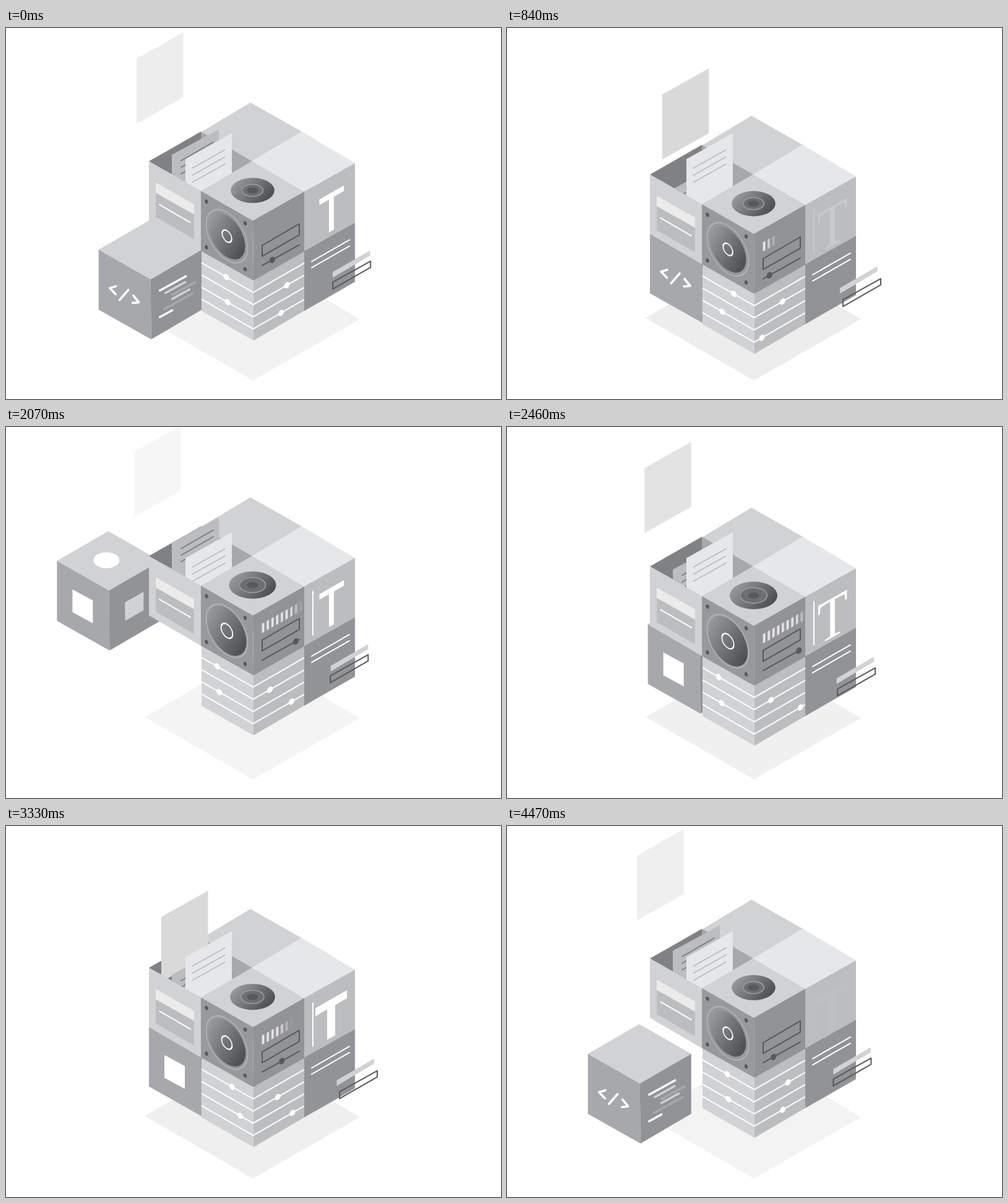
An HTML page for the animation above (4500 ms loop, 800x600 px).

```html
<!DOCTYPE html>
<html lang="en">
<head>
<meta charset="utf-8">
<title>Isometric toolbox</title>
<style>
  html, body { margin: 0; width: 100%; height: 100%; overflow: hidden; background: #fff; }
  svg { display: block; width: 100vw; height: 100vh; }
</style>
</head>
<body>
<svg id="stage" viewBox="0 0 800 600">
  <defs>
    <linearGradient id="cone" x1="0" y1="0.2" x2="1" y2="0.7">
      <stop offset="0" stop-color="#9d9ea2"/><stop offset="1" stop-color="#4a4b4e"/>
    </linearGradient>
    <linearGradient id="level">
      <stop offset="0" stop-color="#adaeb1"/><stop offset=".5" stop-color="#fff"/><stop offset="1" stop-color="#b4b5b8"/>
    </linearGradient>
  </defs>
</svg>
<script>
const LOOP = 4500, HALF = LOOP / 2;
const LIGHT = '#d1d2d4', MID = '#bcbdbf', GREY = '#a7a8ac', DEEP = '#929397', INK = '#58595b';

const poly = (points, fill, more = '') => `<polygon points="${points}" fill="${fill}" ${more}/>`;
const line = (x1, y1, x2, y2, color, width = 2, more = '') =>
  `<line x1="${x1}" y1="${y1}" x2="${x2}" y2="${y2}" stroke="${color}" stroke-width="${width}" stroke-linecap="round" ${more}/>`;
const oval = (x, y, rx, ry, fill, more = '') =>
  `<ellipse cx="${x}" cy="${y}" rx="${rx}" ry="${ry}" fill="${fill}" ${more}/>`;
const group = (id, body) => `<g id="${id}">${body}</g>`;

// Small cube; its left top corner is the local origin.
const cube = () =>
  poly('0,0 83,-48 167,0 84,48', LIGHT) +
  poly('0,0 84,48 85,145 0,97', GREY) +
  poly('84,48 167,0 167,97 85,145', DEEP);

const codeLine = (x, y, w, color) => line(x, y, x + w, y - w * 0.55, color, 3.4);
const codeCube = cube() +
  codeLine(99, 66, 42, '#fff') + codeLine(108, 70, 32, LIGHT) + codeLine(119, 73, 37, GREY) +
  codeLine(119, 79.5, 28, LIGHT) + codeLine(106, 96, 47, GREY) + codeLine(99, 109, 20, '#fff') +
  `<path d="M28 59L18 62L27.5 72M48 65L34 81M56 74L65 85L55 86" fill="none" stroke="#fff"
    stroke-width="3.6" stroke-linecap="round" stroke-linejoin="round"/>`;

const socialCube = cube() +
  poly('25,46 58,64 58,101 25,83', '#fff') +
  oval(80, -1, 21, 13, '#fff') +
  poly('110,67 140,50 140,80 110,97', LIGHT);

const backBlocks =
  poly('395,0 478,47 398,95 315,48', LIGHT) +
  poly('478,47 564,98 482,144 398,95', '#e6e7e8') +
  poly('482,144 564,98 564,194 482,240', MID) +
  poly('482,240 564,194 564,290 482,337', DEEP) +
  line(494, 257, 555, 222, '#fff') + line(494, 267, 555, 232, '#fff') +
  poly('231,95 315,47 315,143', '#808185') +
  poly('315,47 398,95 315,143', GREY);

const letters = group('letters',
  line(496, 152, 496, 222, '#fff', 2, 'id="caret"') +
  `<g transform="matrix(1 -.57 0 1 526 145.5)" fill="#fff">
    <path class="glyph" d="M-19.5 0H20V9H4V62H-4V9H-19.5Z"/>
    <text class="glyph" transform="scale(.83 1)" x="0" y="64" font-size="97" text-anchor="middle"
      font-family="'Liberation Serif', 'Times New Roman', serif">T</text>
    <path class="glyph" d="M-26 0H25V13H6V62H-7V13H-26Z"/>
  </g>`);

const tags =
  group('tag', poly('0,0 60.5,-35 60.5,-27 0,9', LIGHT)) +
  group('frame', poly('0,0 61,-34 61,-24 0,11', 'none', `stroke="${INK}" stroke-width="2" stroke-linejoin="round"`));

const page = (w, h, rise, fill) => poly(`0,0 ${w},${-rise} ${w},${h - rise} 0,${h}`, fill);
const ruled = (x, y, w, rise, gap, color) =>
  [0, 1, 2].map(i => line(x, y + i * gap, x + w, y + i * gap - rise, color)).join('');

const papers =
  group('sheet', page(75.5, 105, 42.5, '#d9d9d9')) +
  group('middle', page(76, 80, 41, MID) + ruled(15, 9.5, 52, 30, 10.7, '#808285')) +
  `<g transform="translate(290 212)">${page(75, 105, 42, '#e6e7e8') + ruled(11.5, 14.5, 52.5, 29.5, 11.5, MID)}</g>`;

const boxFront =
  poly('231,95 315,143 315,240 231,191', LIGHT) +
  poly('242,129 304,164.5 304,221 242,185', MID) +
  poly('242,129 304,164.5 304,181 242,146', '#ebebec') +
  line(248, 165, 298, 194, '#fff');

const rail = i => 307 + 19.7 * i;
const mixer =
  poly('316,240 400,288 400,385 316,337', LIGHT) +
  poly('400,288 482,240 482,337 400,385', MID) +
  [0, 1, 2, 3].map(i => `<path d="M316 ${rail(i) - 48}l83.5 48l82.5 -47.5" fill="none" stroke="#fff" stroke-width="2"/>`).join('') +
  [-1, 1, -1, 1].map(side => `<g class="knob">${oval(0, 0, 4, 5.6, '#fff', `transform="rotate(${35 * side})"`)}</g>`).join('');

const bars = Array.from({ length: 9 }, (_, i) => {
  const x = 413 + i * 7.6, y = 205 - i * 4.3;
  return poly(`${x},${y} ${x + 5},${y - 3} ${x + 5},${y + 12} ${x},${y + 15}`, 'url(#level)', 'class="bar"');
}).join('');

const screw = (x, y) => oval(x, y, 2.6, 3.5, INK, `transform="rotate(-20 ${x} ${y})"`);
const speaker =
  poly('315,143 398,95 482,144 399,191', LIGHT) +
  poly('315,143 399,191 400,288 315,240', '#98999d') +
  poly('399,191 482,144 482,241 400,288', DEEP) +
  screw(324, 160) + screw(386.5, 195) + screw(324, 234) + screw(386.5, 269.5) +
  `<g transform="matrix(.84 .48 0 .965 357 216)">
    <circle r="40" fill="none" stroke="#b1b2b5" stroke-width="2"/>
    <circle id="woofer" fill="url(#cone)"/>
    <circle id="cap" fill="none" stroke="#fff" stroke-width="2.2"/>
  </g>` +
  oval(398.5, 142, 36, 20.5, 'url(#cone)', 'id="disc"') +
  oval(398.5, 142, 17, 10, '#6d6e71', 'id="ring" stroke="#97989b" stroke-width="1.8"') +
  oval(398.5, 142, 9, 5.2, INK) +
  bars +
  poly('414,231 474,196 474,214 414,248.5', 'none', `stroke="${INK}" stroke-width="2" stroke-linejoin="round"`) +
  line(414, 263.5, 474, 230, INK) +
  group('dial', oval(0, 0, 4.3, 5.5, INK, 'transform="rotate(30)"'));

const stage = document.getElementById('stage');
stage.insertAdjacentHTML('beforeend',
  poly('224,469 399,368 572,471 399,570', '#000', 'id="shadow"') +
  group('social', socialCube) + group('code', codeCube) +
  `<g class="bob">${backBlocks + letters + tags}</g>` +
  papers +
  `<g class="bob">${boxFront + mixer + speaker}</g>`);

const $ = id => document.getElementById(id);
const all = name => [...document.querySelectorAll('.' + name)];
const bobs = all('bob'), knobs = all('knob'), levels = all('bar'), glyphs = all('glyph');
const set = (el, attrs) => Object.entries(attrs).forEach(([k, v]) => el.setAttribute(k, v));
const move = (el, x, y) => set(el, { transform: `translate(${x.toFixed(2)} ${y.toFixed(2)})` });

const clamp = v => Math.max(0, Math.min(1, v));
const ease = v => (v = clamp(v), v < 0.5 ? 4 * v ** 3 : 1 - 4 * (1 - v) ** 3);
const since = (t, start, span) => (t - start + LOOP) % span;
const wave = (t, cycles, peak = 0) => Math.cos(2 * Math.PI * cycles * (t - peak) / LOOP);

const LETTER_SWAPS = [450, 865, 1650, 2270, 2870, 4475];

// A block slides in, rests, slides out and gives way to the other one.
function slide(el, age, top, rise) {
  const out = 164 * (1 - ease((age - 20) / 720) + ease((age - 1560) / 990));
  move(el, 231 - out, top + 190 + out * rise);
  set(el, { opacity: clamp(age / 60) * clamp((HALF - age) / 60) });
}

function drawPapers(t, top, sway) {
  const age = since(t, 1815, HALF), glide = ease(age / 1440);
  const drop = 3e-7 * Math.max(0, age - 935) ** 3;
  move($('sheet'), 206 + 45 * glide, top - 74 + 28 * glide + drop);
  set($('sheet'), { opacity: age < 1785 ? clamp((age - 75) / 780) : 0 });
  move($('middle'), 268, 220.3 + 44 * sway);
}

function drawLetters(t) {
  const step = LETTER_SWAPS.filter(s => s <= t).length;
  const gap = Math.min(...LETTER_SWAPS.map(s => Math.abs(t - s)));
  glyphs.forEach((g, i) => set(g, { visibility: i === step % 3 ? 'visible' : 'hidden' }));
  set($('letters'), { opacity: clamp(gap / 120) });
  set($('caret'), { visibility: t % 1350 > 400 ? 'visible' : 'hidden' });
}

function drawMixer(t) {
  const spots = [
    357 + 8 * wave(t, 1) - 9 * wave(t, 2),
    440 + 14 * wave(t, 1),
    361 - 10 * wave(t, 1) - 13 * wave(t, 2) + 20 * wave(t, 3),
    447 + 28 * wave(t, 1, 3050) + 10 * wave(t, 2)
  ];
  knobs.forEach((k, i) => move(k, spots[i], rail(i) - Math.abs(spots[i] - 399.5) * 0.575));
}

function drawSpeaker(t) {
  const dial = 444 + 22 * wave(t, 1, 2500) + 7 * wave(t, 2);
  move($('dial'), dial, 263.5 - (dial - 414) * 0.558);

  const beat = Math.max(0, wave(t, 1, 2450));
  set($('woofer'), { r: 35 + 3 * beat });
  set($('cap'), { r: 9.3 + 2.2 * beat });
  set($('disc'), { rx: 35.3 + 3.2 * beat, ry: 20.4 + 2 * beat });
  set($('ring'), { rx: 16.8 + 5 * beat, ry: 9.8 + 2.8 * beat });

  const loud = 4.2 + 4 * wave(t, 1, 2700) - 2.5 * wave(t, 3);
  levels.forEach((b, i) => set(b, { opacity: 0.9 * clamp((loud - i) / 3) }));
}

function draw(t) {
  const sway = wave(t, 2, 690), top = 126.5 + 17 * sway;
  bobs.forEach(g => move(g, 0, top));
  set($('shadow'), { 'fill-opacity': 0.071 - (142 - top) * 0.001 });

  slide($('code'), since(t, 4120, LOOP), top, 0.59);
  slide($('social'), since(t, 1845, LOOP), top, -0.587);

  const tagX = 530.8 + 8 * sway, frameX = 533 + 10.5 * wave(t, 2, 735);
  move($('tag'), tagX, 274 + (tagX - 528) * 0.45);
  move($('frame'), frameX, 288.5 + (frameX - 524) * 0.47);

  drawPapers(t, top, sway);
  drawLetters(t);
  drawMixer(t);
  drawSpeaker(t);
}

const start = performance.now();
function tick() {
  draw((performance.now() - start) % LOOP);
  requestAnimationFrame(tick);
}
tick();
</script>
</body>
</html>
```
